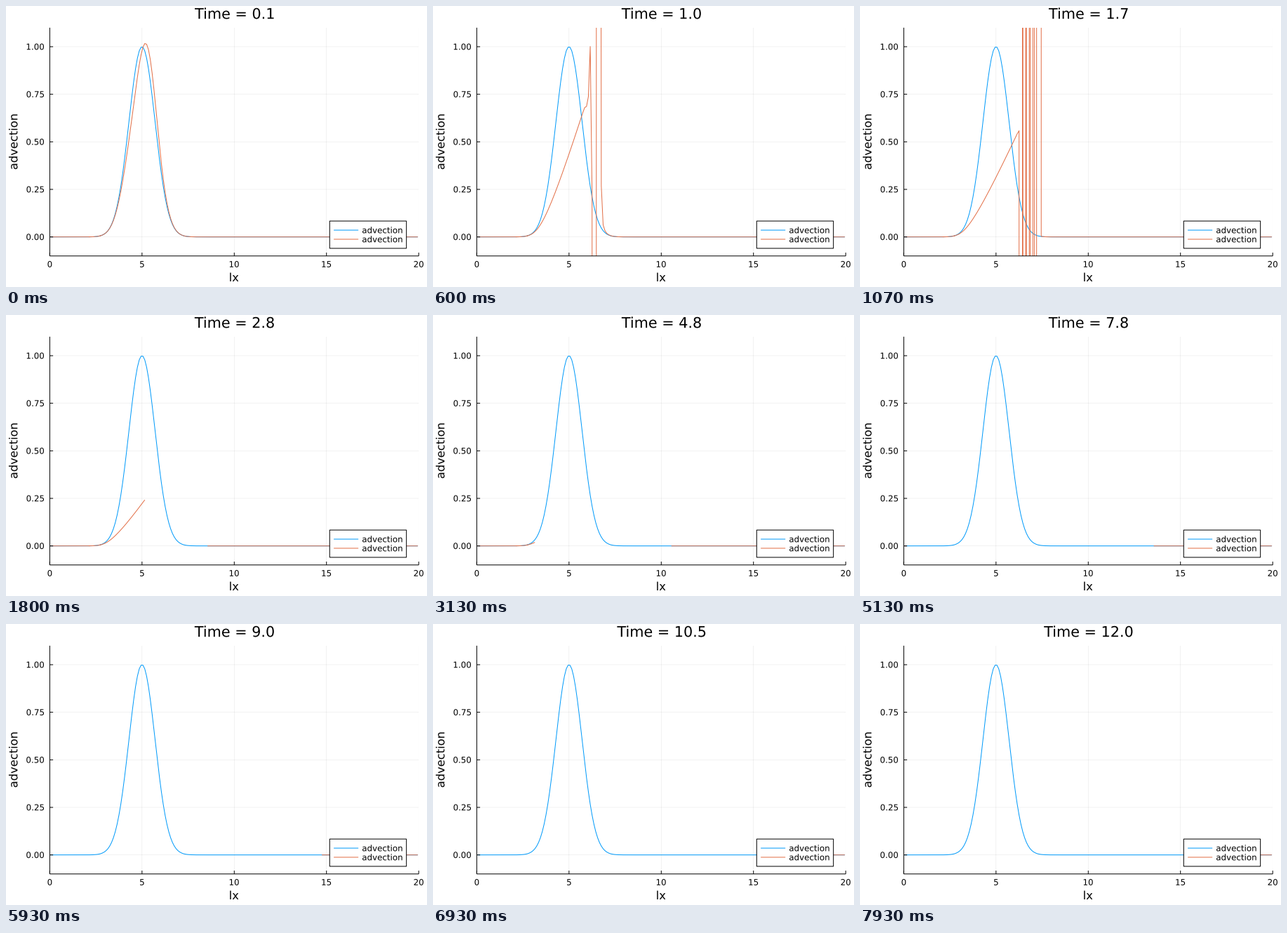
A matplotlib script that plays this animation: 600x400 px, repeating every 8 s.

```python
import numpy as np
import matplotlib.pyplot as plt
from matplotlib.animation import FuncAnimation
from matplotlib.patches import PathPatch, Rectangle
from matplotlib.textpath import TextPath
from matplotlib.transforms import Affine2D

W, H, DPI = 600, 400, 100
LEFT, RIGHT, TOP, BOTTOM = 62.39, 588.19, 30.87, 355.8
BLUE, ORANGE = "#009afa", "#e36f47"
PT = 72 / DPI
SMALL, MEDIUM, LARGE = 11.86, 16.3, 20.75
TICK = 4.72

LX, NX, STEPS = 20.0, 200, 120
VX = 1.0
DX = LX / NX
DT = DX / VX

LOOP, INTERVAL = 8000, 20
FRAMES = LOOP // INTERVAL

np.seterr(all="ignore")


def advect(u):
    """One explicit upwind step of u_t + vx (u^2)_x = 0."""
    slope = np.diff(u * u) / DX
    new = u.copy()
    new[1:] -= DT * max(VX, 0.0) * slope
    new[:-1] -= DT * min(VX, 0.0) * slope
    return new


def clip_curve(x, y, lim=3.0):
    """Cut the polyline to |y| <= lim, so huge values still plot cleanly."""
    pts = []
    for x0, a, b in zip(x, y, y[1:]):
        finite = np.isfinite(a) and np.isfinite(b)
        if not finite or min(a, b) > lim or max(a, b) < -lim:
            pts.append((np.nan, np.nan))
            continue
        for v, t in ((a, 0.0), (b, 1.0)):
            c = min(max(v, -lim), lim)
            if c != v:
                t = (c - a) / (b - a)
            pts.append((x0 + t * DX, c))
    return np.array(pts).T


x = (np.arange(NX) + 0.5) * DX
start = np.exp(-(x - LX / 4) ** 2)
curves = []
u = start
for _ in range(STEPS):
    u = advect(u)
    curves.append(clip_curve(x, u))

fig = plt.figure(figsize=(W / DPI, H / DPI), dpi=DPI, facecolor="white")
ax = fig.add_axes([LEFT / W, 1 - BOTTOM / H, (RIGHT - LEFT) / W, (BOTTOM - TOP) / H])
ax.set(xlim=(0, LX), ylim=(-0.1, 1.1))
ax.axis("off")
stage = fig.add_axes([0, 0, 1, 1], zorder=2)
stage.set(xlim=(0, W), ylim=(H, 0))
stage.axis("off")


def px(v):
    return LEFT + (RIGHT - LEFT) * v / LX


def py(v):
    return BOTTOM - (BOTTOM - TOP) * (v + 0.1) / 1.2


def rule(x0, y0, x1, y1, color="black", z=2):
    stage.plot([x0, x1], [y0, y1], color=color, lw=PT, zorder=z,
               solid_capstyle="butt", snap=False)


def glyphs(x0, y0, text, size, align=0.5, angle=0):
    """Text outline with its ink aligned to x0 and its baseline on y0."""
    path = TextPath((0, 0), text, size=size, prop={"family": "DejaVu Sans"})
    box = path.get_extents()
    move = Affine2D().translate(-box.x0 - align * box.width, 0)
    move.rotate_deg(angle).scale(1, -1).translate(x0, y0)
    return path.transformed(move)


def label(*args, **kw):
    patch = PathPatch(glyphs(*args, **kw), facecolor="black", lw=0, snap=False, zorder=6)
    return stage.add_patch(patch)


# grid, ticks and axes
grid = dict(color="black", alpha=0.1, lw=0.5 * PT, zorder=0, snap=False)
for v in range(0, 21, 5):
    ax.axvline(v, **grid)
    rule(px(v), BOTTOM, px(v), BOTTOM - TICK)
    label(px(v), 371.8, str(v), SMALL)
for v in np.arange(5) / 4:
    ax.axhline(v, **grid)
    rule(LEFT, py(v), LEFT + TICK, py(v))
    label(54, py(v) + 4.3, f"{v:.2f}", SMALL, align=1)
rule(LEFT, TOP, LEFT, BOTTOM)
rule(LEFT, BOTTOM, RIGHT, BOTTOM)
mid = (LEFT + RIGHT) / 2
label(mid, 392, "lx", MEDIUM)
label(16.3, (TOP + BOTTOM) / 2, "advection", MEDIUM, angle=90)
title = label(mid, 18.2, "Time", LARGE)

# legend
BOX_X, BOX_Y, ROW, PAD = 461.3, 306.09, 12.96, 5.84
stage.add_patch(Rectangle((BOX_X, BOX_Y), 570.66 - BOX_X, 3 * ROW, facecolor="white",
                          edgecolor="black", lw=PT, snap=False, zorder=4))
for row, color in ((1, BLUE), (2, ORANGE)):
    y0 = BOX_Y + row * ROW
    rule(BOX_X + PAD, y0, BOX_X + 7 * PAD, y0, color, z=5)
    label(BOX_X + 8 * PAD, y0 + 4.3, "advection", SMALL, align=0)

style = dict(lw=PT, snap=False, solid_capstyle="butt")
ax.plot(x, start, color=BLUE, zorder=2, **style)
wave, = ax.plot([], [], color=ORANGE, zorder=3, **style)


def draw(k):
    # steps change on a 10 ms clock, so look slightly ahead
    n = int((k * INTERVAL + 14) * STEPS / LOOP) % STEPS
    wave.set_data(*curves[n])
    title.set_path(glyphs(mid, 18.2, f"Time = {(n + 1) * DT:.1f}", LARGE))
    return wave, title


anim = FuncAnimation(fig, draw, frames=FRAMES, interval=INTERVAL,
                     repeat=True, repeat_delay=0)
plt.show()
```
